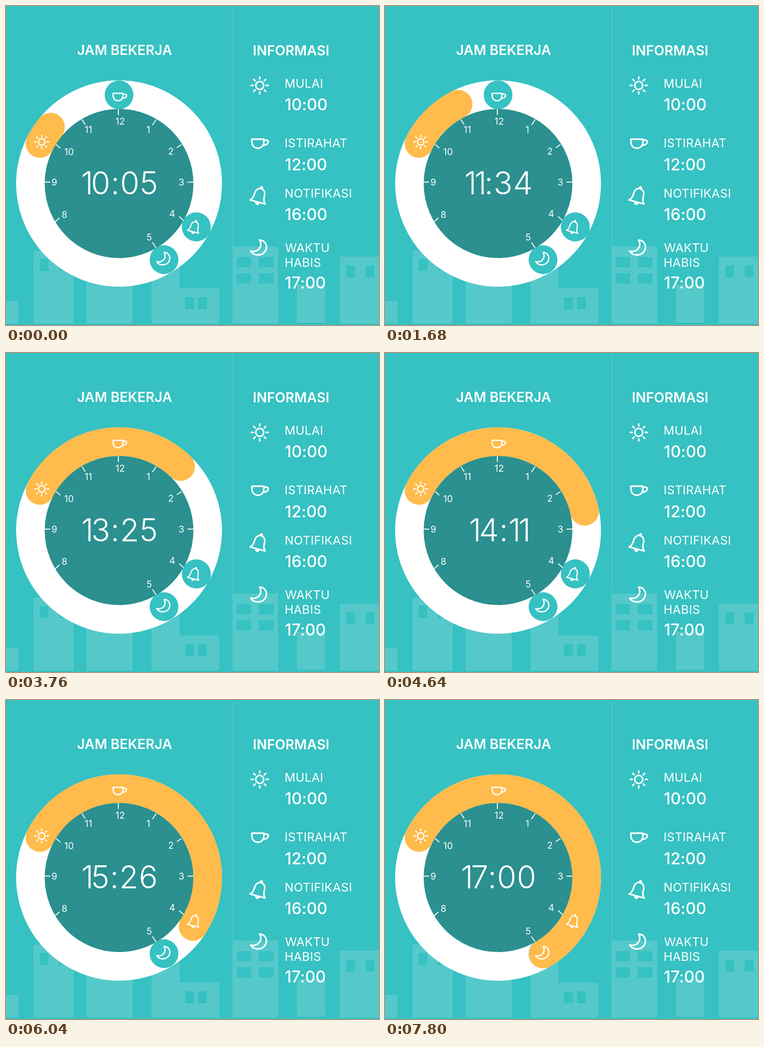
Write an HTML page that moves like this. It is 810 px wide and 691 px high and loops after 9640 ms.

```html
<!DOCTYPE html>
<html lang="id">
<head>
<meta charset="utf-8">
<title>Jam Bekerja</title>
<style>
  html, body { margin: 0; width: 100%; height: 100%; overflow: hidden; background: #36c1c2; }
  svg { display: block; width: 810px; height: 691px; }
  text { font-family: Inter, "Open Sans", sans-serif; font-feature-settings: "calt" 0; fill: #fff; }
  .head { font-size: 29.6px; font-weight: 600; }
  .label { font-size: 26px; letter-spacing: .3px; }
  .hour { font-size: 35px; font-weight: 500; }
  .num { font-size: 20px; text-anchor: middle; }
  #time { font-size: 68px; font-weight: 300; letter-spacing: 1px; text-anchor: middle; }
  #time .one { letter-spacing: -5px; }
  .line { fill: none; stroke: #fff; stroke-width: 3.4; stroke-linejoin: round; stroke-linecap: round; }
  .solid { fill: #fff; stroke: none; }
</style>
</head>
<body>
<svg viewBox="0 0 810 691">
  <defs>
    <g id="sun" class="line" stroke-width="4">
      <circle r="8.6"/>
      <path id="rays"/>
    </g>
    <g id="cup" class="line">
      <path d="M-17.5-9.5H8.5V-4C8.5 5 3 10-4.5 10S-17.5 5-17.5-4Z"/>
      <path d="M9-7.5H13.5C17.5-7.5 18.5-5 17.8-2.5C16.8 1.5 12 3.5 6.5 3.8"/>
    </g>
    <g id="bell" class="line">
      <g transform="rotate(15)">
        <path d="M-17 14C-12 10-11 5-11-2C-11-11-6-16 0-16S11-11 11-2C11 5 12 10 17 14Z"/>
        <circle class="solid" cy="-18" r="3.4"/>
        <path class="solid" d="M-5 15.5a5 5 0 0 0 10 0z"/>
      </g>
    </g>
    <path id="moon" class="line" d="M2.5-16.5C15.5-15.5 20.5-2.5 14.5 7.5C7.5 18.5-10.5 18.5-17 7.5C-1.5 10.5 9.5-1.5 2.5-16.5Z"/>
  </defs>

  <rect width="810" height="691" fill="#36c1c2"/>
  <rect x="490.5" y="3" width="4" height="685" fill="#48c5c8"/>
  <path id="city" fill="#55c9ca" fill-rule="evenodd"/>

  <circle cx="245.5" cy="384.5" r="223.5" fill="#fff"/>
  <g fill="#36c1c2">
    <circle cx="245.5" cy="192.5" r="31.2"/>
    <circle cx="413.3" cy="478.5" r="31.5"/>
    <circle cx="343.2" cy="549.5" r="31.2"/>
  </g>
  <path id="arc" fill="none" stroke="#ffbb4b" stroke-width="62" stroke-linecap="round"/>
  <circle cx="245.5" cy="384.5" r="161.5" fill="#2b908f"/>
  <g id="dial" stroke="#fff" stroke-width="2"></g>

  <use href="#sun" transform="translate(77.5 294.5) scale(.82)"/>
  <use href="#cup" transform="translate(247 197) scale(.82)"/>
  <use href="#bell" transform="translate(409 479) scale(.74)"/>
  <use href="#moon" transform="translate(341.5 547.5) scale(.84)"/>
  <text id="time" x="247" y="408"></text>

  <text class="head" x="257.5" y="106" text-anchor="middle">JAM BEKERJA</text>
  <text class="head" x="536" y="106.500">INFORMASI</text>

  <use href="#sun" x="551" y="172"/>
  <text class="label" x="605" y="177">MULAI</text>
  <text class="hour" x="605.5" y="226">10:00</text>

  <use href="#cup" x="551.5" y="298"/>
  <text class="label" x="605" y="306">ISTIRAHAT</text>
  <text class="hour" x="605.5" y="355.500">12:00</text>

  <use href="#bell" x="550" y="411"/>
  <text class="label" x="605" y="415">NOTIFIKASI</text>
  <text class="hour" x="605.5" y="464">16:00</text>

  <use href="#moon" x="548.500" y="523.500"/>
  <text class="label" x="606" y="533">WAKTU</text>
  <text class="label" x="605" y="565">HABIS</text>
  <text class="hour" x="605.5" y="612">17:00</text>
</svg>
<script>
const $ = id => document.getElementById(id);
const LOOP = 9640, STEP = 40, STEPS = 195;
const CX = 245.5, CY = 384.5, R = 192.5;
const START = -63.2, FROM = -50.6, TO = 149.4;

// x, y, width, height; overlapping windows become holes
const blocks = [
  [0, 639, 27, 49], [60, 530, 87, 158], [73, 548, 19, 26], [115, 548, 19, 26],
  [175, 560, 100, 128], [316, 540, 61, 148], [377, 612, 86, 76],
  [389, 631, 19, 26], [417, 631, 19, 26],
  [493, 521, 98, 167], [501, 544, 31, 22], [549, 544, 32, 22],
  [501, 579, 31, 22], [549, 579, 32, 22],
  [632, 604, 61, 82], [725, 543, 85, 145], [739, 562, 19, 26], [781, 562, 19, 26]
];
$("city").setAttribute("d", blocks.map(([x, y, w, h]) => `M${x} ${y}h${w}v${h}h${-w}z`).join(""));

// label, label centre, tick ends
const marks = [
  [12, 248, 250, 244, 223, 244, 236], [1, 309, 268, 326, 246, 318, 258],
  [2, 358, 315, 381, 300, 371, 307], [3, 381, 382, 394, 381.5, 407, 381.5],
  [4, 361, 450, 376, 456, 386, 465], [5, 311, 501, 318, 512, 326, 524],
  [8, 127, 452, 106, 468, 116, 459], [9, 105, 382, 84, 381.5, 96, 381.5],
  [10, 137, 316, 109, 300, 118, 308], [11, 179, 268, 165, 246, 172, 257]
];
$("dial").innerHTML = marks.map(([n, x, y, x1, y1, x2, y2]) =>
  `<path d="M${x1} ${y1}L${x2} ${y2}"/><text class="num" stroke="none" x="${x}" y="${y + 7.3}">${n}</text>`).join("");

const polar = (deg, r) => {
  const a = deg * Math.PI / 180;
  return [r * Math.sin(a), -r * Math.cos(a)];
};
const onRing = deg => {
  const [x, y] = polar(deg, R);
  return `${CX + x} ${CY + y}`;
};

let rays = "";
for (let a = 0; a < 360; a += 45) rays += `M${polar(a, 14)}L${polar(a, 18.4)}`;
$("rays").setAttribute("d", rays);

let last = -1;
function draw(now) {
  const k = Math.min(STEPS, Math.floor(now % LOOP / STEP));
  if (k !== last) {
    last = k;
    const p = k / STEPS;
    const end = FROM + (TO - FROM) * p * p * (3 - 2 * p);
    const large = end - START > 180 ? 1 : 0;
    $("arc").setAttribute("d", `M${onRing(START)}A${R} ${R} 0 ${large} 1 ${onRing(end)}`);

    const min = Math.floor(605 + 415 * p + 1e-6);
    const clock = Math.floor(min / 60) + ":" + String(min % 60).padStart(2, "0");
    $("time").innerHTML = clock.replace(/1/g, '<tspan class="one">1</tspan>');
  }
  requestAnimationFrame(draw);
}
const t0 = performance.now();
draw(0);
requestAnimationFrame(function run() {
  last = last;
});
</script>
</body>
</html>
```
